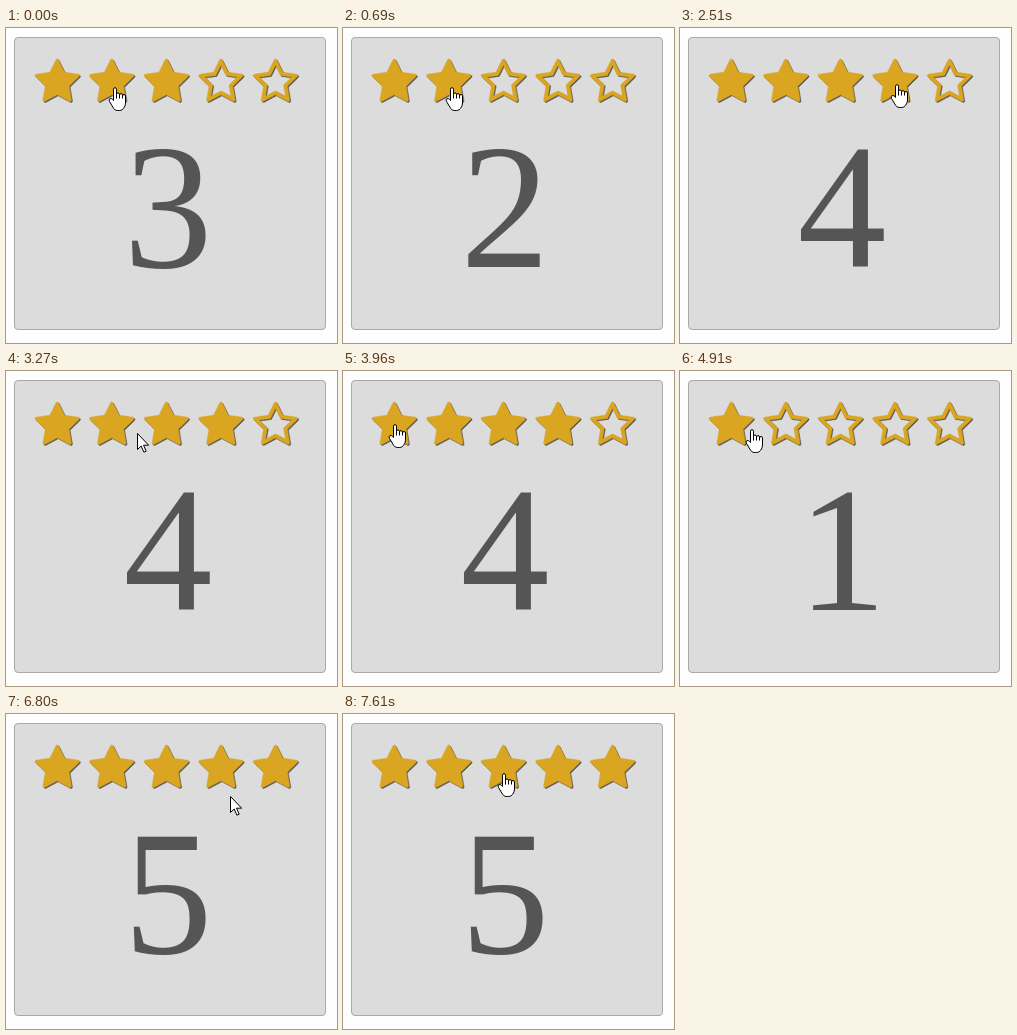
Write an HTML page that moves like this. It is 331 px wide and 315 px high and loops after 8000 ms.

```html
<!DOCTYPE html>
<html lang="en">
<head>
<meta charset="utf-8">
<title>Star rating</title>
<style>
  html, body { margin: 0; width: 100%; height: 100%; overflow: hidden; background: #fefefe; }

  .card {
    position: absolute; left: 8px; top: 9px; width: 312px; height: 293px;
    box-sizing: border-box; border: 1px solid #a9a9a9; border-radius: 4px; background: #dcdcdc;
  }

  .score {
    position: absolute; left: 108px; top: 79px; width: 108px; height: 200px; overflow: hidden;
    font: 178px/200px "Liberation Serif", "Times New Roman", Times, serif;
    color: #555; text-align: center;
  }
  .score div { animation: score 8s step-end infinite; }
  .score span { display: block; height: 200px; }

  svg { position: absolute; left: 0; top: 0; width: 331px; height: 315px; }

  .stars { fill: #daa520; stroke: #daa520; stroke-width: 20; filter: drop-shadow(1px 1px .5px #555); }
  .stars use { animation: 8s step-end infinite; }
  .stars .s2 { animation-name: star2; }
  .stars .s3 { animation-name: star3; }
  .stars .s4 { animation-name: star4; }
  .stars .s5 { animation-name: star5; }

  .cursor { fill: #fff; stroke: #000; stroke-linejoin: round; animation: move 8s step-end infinite; }
  .hand, .arrow { animation: shape 8s step-end infinite; }
  .hand { --over: 1; --off: 0; }
  .arrow { --over: 0; --off: 1; }

  /* Ratings in order: 3, 2, 4, 1, 5 */
  @keyframes score {
    0% { transform: translateY(0); }
    8.625% { transform: translateY(-200px); }
    31.375% { transform: translateY(-400px); }
    54.875% { transform: translateY(-600px); }
    77.875%, 100% { transform: translateY(-800px); }
  }

  /* nonzero fills the star, evenodd leaves it hollow */
  @keyframes star2 {
    0%, 77.875%, 100% { fill-rule: nonzero; }
    54.875% { fill-rule: evenodd; }
  }
  @keyframes star3 {
    0%, 31.375%, 77.875%, 100% { fill-rule: nonzero; }
    8.625%, 54.875% { fill-rule: evenodd; }
  }
  @keyframes star4 {
    0%, 54.875% { fill-rule: evenodd; }
    31.375%, 77.875%, 100% { fill-rule: nonzero; }
  }
  @keyframes star5 {
    0% { fill-rule: evenodd; }
    77.875%, 100% { fill-rule: nonzero; }
  }

  /* Arrow between the stars, hand over them */
  @keyframes shape {
    0%, 21.125%, 41%, 64.75%, 69.5%, 90%, 100% { opacity: var(--over); }
    19.375%, 39.375%, 63.125%, 67.875%, 83.125% { opacity: var(--off); }
  }

  @keyframes move {
    0% { transform: translate(109px, 59px); }
    13.75% { transform: translate(105px, 61px); }
    15.625% { transform: translate(120px, 63px); }
    17.5% { transform: translate(158px, 63px); }
    19.375% { transform: translate(191px, 63px); }
    21.125% { transform: translate(206px, 62px); }
    22.875% { transform: translate(212px, 59px); }
    24.625% { transform: translate(216px, 57px); }
    26.375% { transform: translate(217px, 56px); }

    34.5% { transform: translate(212px, 57px); }
    36.125% { transform: translate(196px, 60px); }
    37.75% { transform: translate(165px, 62px); }
    39.375% { transform: translate(131px, 62px); }
    41% { transform: translate(104px, 60px); }
    42.625% { transform: translate(85px, 58px); }
    44.25% { transform: translate(73px, 56px); }
    46.125% { transform: translate(63px, 55px); }
    47.875% { transform: translate(56px, 54px); }
    49.5% { transform: translate(52px, 53px); }

    58.25% { transform: translate(55px, 54px); }
    59.875% { transform: translate(72px, 58px); }
    61.5% { transform: translate(100px, 63px); }
    63.125% { transform: translate(133px, 67px); }
    64.75% { transform: translate(170px, 65px); }
    66.375% { transform: translate(208px, 64px); }
    67.875% { transform: translate(240px, 64px); }
    69.5% { transform: translate(256px, 61px); }
    71.125% { transform: translate(262px, 59px); }
    72.625% { transform: translate(264px, 58px); }
    74.5% { transform: translate(265px, 58px); }

    81.25% { transform: translate(260px, 64px); }
    83.125% { transform: translate(246px, 75px); }
    85% { transform: translate(224px, 82px); }
    86.5% { transform: translate(205px, 80px); }
    88.25% { transform: translate(190px, 77px); }
    90% { transform: translate(178px, 72px); }
    91.875% { transform: translate(168px, 67px); }
    93.625% { transform: translate(163px, 63px); }
    95.125%, 100% { transform: translate(161px, 59px); }
  }
</style>
</head>
<body>
<div class="card"></div>

<div class="score"><div>
  <span>3</span><span>2</span><span>4</span><span>1</span><span>5</span>
</div></div>

<svg viewBox="0 0 331 315">
  <defs>
    <path id="star" transform="scale(.026786)" d="M1728 647q0 22-26 48l-363 354 86 500q1 7 1 20 0 21-10.5 35.5t-30.5 14.5q-19 0-40-12l-449-236-449 236q-22 12-40 12-21 0-31.5-14.5t-10.5-35.5q0-6 2-20l86-500-364-354q-25-27-25-48 0-37 56-46l502-73 225-455q19-41 49-41t49 41l225 455 502 73q56 9 56 46z
      M896 263L1085 645 1507 707 1201 1004 1273 1425 896 1226 518 1425 591 1004 285 707 707 645z"/>
  </defs>

  <g class="stars">
    <use href="#star" x="27.2" y="30.1"/>
    <use href="#star" x="81.77" y="30.1" class="s2"/>
    <use href="#star" x="136.34" y="30.1" class="s3"/>
    <use href="#star" x="190.91" y="30.1" class="s4"/>
    <use href="#star" x="245.48" y="30.1" class="s5"/>
  </g>

  <g class="cursor">
    <g class="hand">
      <path d="M-1.5 13.5V2.2a1.5 1.5 0 0 1 3 0V7.5a1.5 1.5 0 0 1 3 0v.6a1.5 1.5 0 0 1 3 0v.9a1.5 1.5 0 0 1 3 0V16q0 3-1.8 5.2-1.6 2.3-4 2.3H2.2q-2.2 0-3.6-2.2L-5.4 14.6q-1.2-2 .2-2.9 1.5-.6 2.7.7z"/>
      <path fill="none" d="M1.5 7.5v4M4.5 8v3.5M7.5 9v2.5"/>
    </g>
    <path class="arrow" d="M.5 .5V16.5l3.7-3.5 2.7 6.2 2.3-1-2.7-6h5.1z"/>
  </g>
</svg>
</body>
</html>
```
